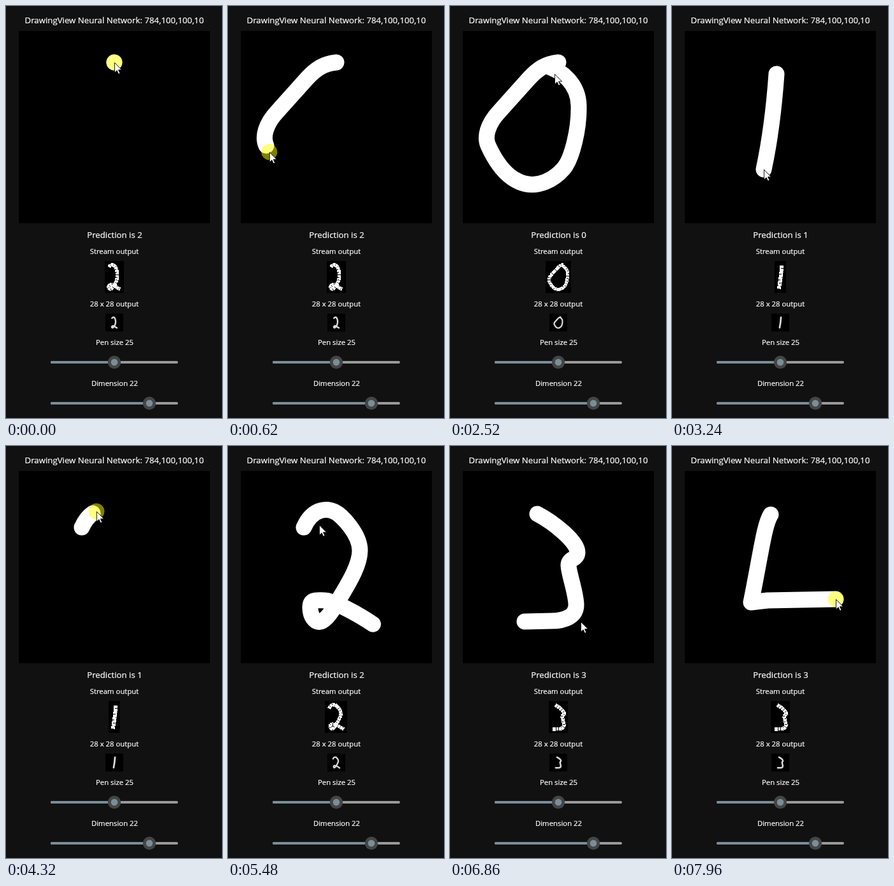
An HTML page for the animation above (7990 ms loop, 339 by 643 pixels).

```html
<!DOCTYPE html>
<html lang="en">
<head>
<meta charset="utf-8">
<title>Digit recognition</title>
<style>
  html, body { margin: 0; width: 100%; height: 100%; overflow: hidden; background: #111; }
  svg { display: block; width: 100vw; height: 100vh; }
  text {
    fill: #fff; stroke: #fff; stroke-width: .22; text-anchor: middle;
    font-family: "Open Sans", "Noto Sans", sans-serif; font-size: 11.36px;
  }
  .big { font-size: 13.26px; }
  .ink { fill: none; stroke: #fff; stroke-width: 25; stroke-linejoin: round; stroke-linecap: round; }
  #stream { stroke-linecap: butt; stroke-dasharray: 17 2; shape-rendering: crispEdges; }
  #small { opacity: .85; }
  .track { stroke: #999; stroke-width: 4; stroke-linecap: round; }
  .filled { stroke: #788e99; }
</style>
</head>
<body>
<svg viewBox="0 0 339 643">
  <defs>
    <g id="thumb">
      <circle r="10.2" fill="#454545"/>
      <circle r="5.3" fill="#788e99"/>
    </g>
  </defs>
  <rect width="339" height="643" fill="#111"/>
  <text class="big" x="170" y="27">DrawingView Neural Network: 784,100,100,10</text>
  <rect x="20" y="39" width="300" height="300"/>
  <path id="pen" class="ink"/>
  <g id="cursor">
    <circle id="glow" r="12.5" fill="#ff0" opacity=".5"/>
    <path d="M.5 .5V16L4.1 12.7L6.6 18.2L9 17.1L6.5 11.8H11.6Z" fill="#fff" stroke="#000" stroke-width=".9"/>
  </g>
  <text class="big" id="label" x="170.5" y="362"></text>
  <text x="170" y="387">Stream output</text>
  <rect id="frame" y="398" height="50"/>
  <path id="stream" class="ink"/>
  <text x="170" y="469">28 x 28 output</text>
  <rect x="156" y="480" width="28" height="28"/>
  <path id="small" class="ink"/>
  <text x="170.5" y="529">Pen size 25</text>
  <path class="track" d="M72 556H268"/>
  <path class="track filled" d="M72 556H170"/>
  <use href="#thumb" x="170" y="556"/>
  <text x="170.5" y="593">Dimension 22</text>
  <path class="track" d="M72 620H268"/>
  <path class="track filled" d="M72 620H225"/>
  <use href="#thumb" x="225" y="620"/>
</svg>
<script>
const LOOP = 7990, LAG = 14, PRESS = 15, RESULT = 40, PAUSE = 100;
const $ = id => document.getElementById(id);
const set = (el, attrs) => { for (const k in attrs) el.setAttribute(k, attrs[k]); };
const ease = (t, from, to) => {
  const v = Math.min(1, Math.max(0, (t - from) / (to - from)));
  return v * v * (3 - 2 * v);
};

// Drawn from..to, pen lifted at up; the cursor then glides go..at to a stop
const strokes = [
  { digit: 0, from: 230, to: 1172, up: 1250, go: 1850, at: 2510,
    d: 'M170 88C150 90 138 98 124 113L78 164C58 185 54 205 60 218S82 264 110 275S164 270 178 254S203 190 202 155S174 102 158 96' },
  { digit: 1, from: 2605, to: 2870, up: 3190, go: 3710, at: 3940,
    d: 'M164 106Q158 190 144 255' },
  { digit: 2, from: 4195, to: 4900, up: 5000, go: 5200, at: 5480, stop: { x: 143, y: 123 },
    d: 'M119 127C134 94 158 98 168 103S207 137 207 163S184 222 172 243S150 275 143 274.5S129 266 129 252S140 241 152 241S204 262 227.5 278' },
  { digit: 3, from: 5950, to: 6520, up: 6560, go: 6610, at: 6860, stop: { x: 205, y: 274 },
    d: 'M137 106C160 118 200 148 200 166C200 178 186 174 186 186S198 230 198 248S180 273 159 273L117 274' },
  { digit: 4, from: 7610, to: 7950, up: LOOP,
    d: 'M155 107C145 122 140 165 124 244L150 241L257 239' }
];
const before = { digit: 2, d: 'M3 16C20 -8 46 -4 56 32S64 105 45 138S10 178 2 165S10 135 30 142S60 165 82 172' };

strokes.forEach((s, i) => {
  s.next = strokes[i + 1];
  s.path = document.createElementNS('http://www.w3.org/2000/svg', 'path');
  set(s.path, { d: s.d });
  s.len = s.path.getTotalLength();
});

const drawn = (s, t) => s.len * ease(t, s.from, s.to);
const last = (ok, other) => strokes.filter(ok).pop() || other;
const mix = (a, b, k) => ({ x: a.x + (b.x - a.x) * k, y: a.y + (b.y - a.y) * k });

function showResult(s) {
  set($('pen'), { d: s.d });
  const b = $('pen').getBBox(), pad = 55;
  const cx = b.x + b.width / 2, cy = b.y + b.height / 2;
  const fit = (y, size) =>
    `translate(170 ${y}) scale(${size / (b.height + pad)}) translate(${-cx} ${-cy})`;
  const w = Math.floor(50 * (b.width + pad) / (b.height + pad));
  set($('frame'), { x: Math.floor(170 - w / 2), width: w });
  set($('stream'), { d: s.d, transform: fit(423, 50) });
  set($('small'), { d: s.d, transform: fit(494, 22) });
  $('label').textContent = 'Prediction is ' + s.digit;
}

function cursorAt(s, t) {
  const tip = s.path.getPointAtLength(drawn(s, t));
  if (!s.next || t < s.go) return tip;
  const goal = s.next.path.getPointAtLength(0);
  const spot = mix(tip, s.stop || goal, ease(t, s.go, s.at));
  return mix(spot, goal, ease(t, s.at + PAUSE, s.next.from - 2 * PRESS));
}

let shown;
function render(t) {
  const s = last(k => k.from - PRESS <= t, strokes[0]);
  const result = last(k => k.up + RESULT <= t, before);
  if (result !== shown) showResult(shown = result);

  set($('pen'), { d: s.d, 'stroke-dasharray': Math.max(.01, drawn(s, t - LAG)) + ' 9999' });
  const { x, y } = cursorAt(s, t);
  set($('cursor'), { transform: `translate(${x} ${y})` });
  set($('glow'), { visibility: t < s.up ? 'visible' : 'hidden' });
}

const start = performance.now();
function tick() {
  render((performance.now() - start) % LOOP);
  requestAnimationFrame(tick);
}
tick();
</script>
</body>
</html>
```
